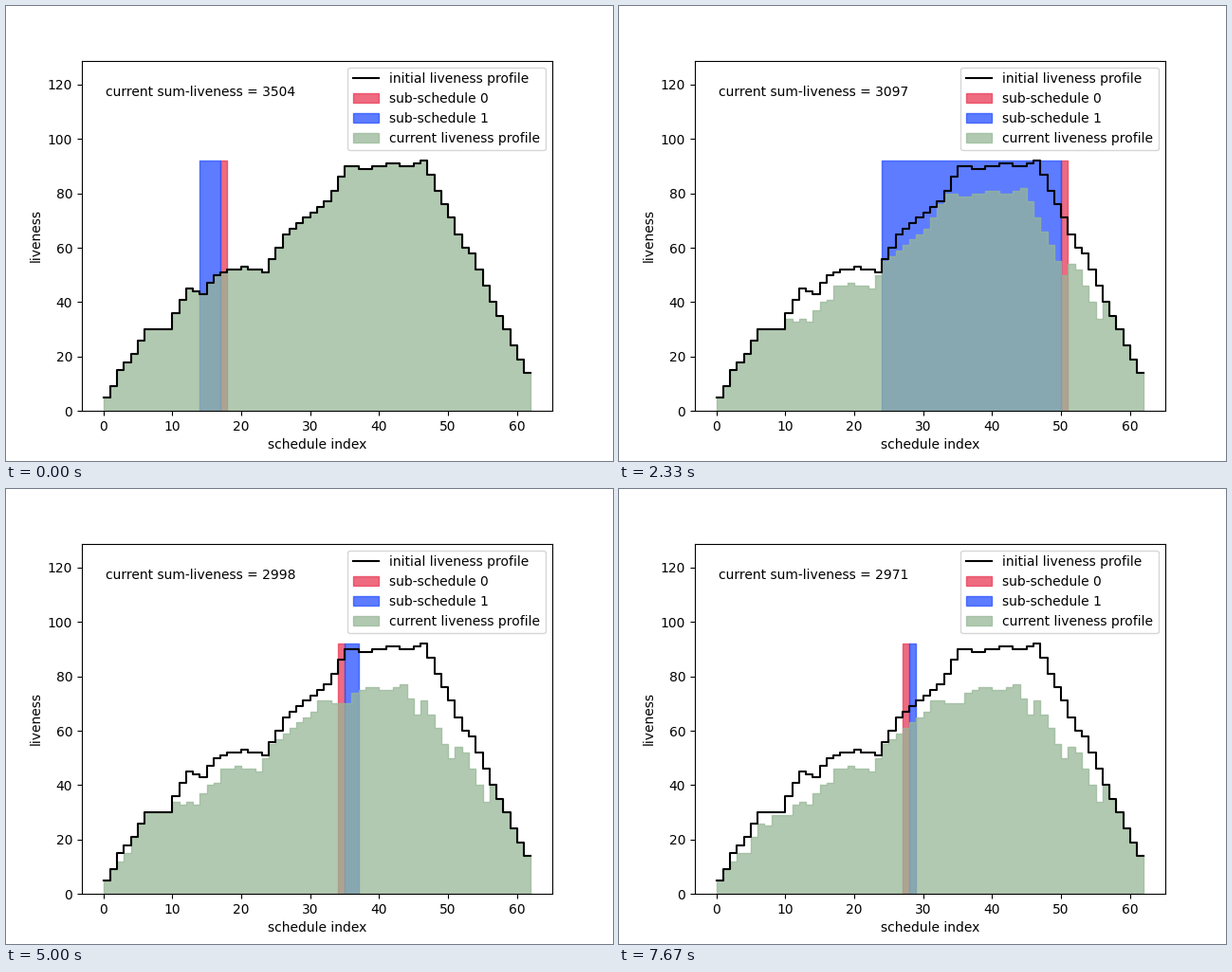
Animation of 640 by 480 pixels, one loop 8000 ms. Source, as a matplotlib script:

```python
import matplotlib.pyplot as plt
import numpy as np
from matplotlib.animation import FuncAnimation

LOOP_MS = 8000
TICK_MS = 40
LEAD_MS = 30  # each tick shows the state reached before the next tick

RED = (233 / 255, 58 / 255, 86 / 255)
BLUE = (39 / 255, 80 / 255, 1.0)
GREEN = (151 / 255, 183 / 255, 151 / 255)
ALPHA = 0.75

# corners of the initial profile, joined by straight slopes
CORNERS = [
    (0, 5), (1, 9), (2, 15), (4, 21), (6, 30), (9, 30), (10, 36), (12, 45),
    (14, 43), (16, 50), (20, 53), (23, 51), (26, 65), (32, 77), (35, 90),
    (38, 89), (41, 91), (44, 90), (46, 92), (52, 60), (53, 58), (56, 40),
    (61, 14),
]

# slot an instruction leaves, slot it is moved to
MOVES = [
    (17, 14), (11, 17), (10, 55), (24, 50), (32, 45), (31, 34),
    (2, 3), (36, 34), (10, 5), (7, 6), (5, 3), (28, 27),
]


def initial_profile():
    xs, ys = zip(*CORNERS)
    levels = np.interp(np.arange(xs[-1] + 1), xs, ys)
    return np.floor(levels + 0.5).astype(int)


def apply_move(profile, src, dst):
    """Shift the passed block by one slot and by the instruction's own rise."""
    result = profile.copy()
    if src < dst:
        rise = profile[src] - profile[src - 1]
        result[src:dst + 1] = profile[src + 1:dst + 2] - rise
    else:
        rise = profile[src + 1] - profile[src]
        result[dst:src + 1] = profile[dst - 1:src] + rise
        result[dst] = max(result[dst], profile[dst])
    return result


def spans(src, dst, moved):
    """Return the spans of the instruction and of the block it passes."""
    first, end = min(src, dst), max(src, dst) + 1
    slot = dst if moved else src
    block = (first + 1, end) if slot == first else (first, end - 1)
    return (slot, slot + 1), block


def closed(profile):
    return np.append(profile, profile[-1])


fig, ax = plt.subplots(figsize=(6.4, 4.8), dpi=100)
profile = initial_profile()
slots = np.arange(len(profile) + 1)
peak = profile.max()
line, = ax.step(slots, closed(profile), where="post", color="black")


def build_state(levels, src, dst, moved):
    bars = [ax.fill_between(span, peak, color=color, alpha=ALPHA)
            for span, color in zip(spans(src, dst, moved), (RED, BLUE))]
    area = ax.fill_between(slots, closed(levels), step="post", color=GREEN,
                           alpha=ALPHA)
    label = ax.text(0.05, 0.9, f"current sum-liveness = {levels.sum()}",
                    transform=ax.transAxes)
    return [*bars, area, label]


states = []
for src, dst in MOVES:
    states.append(build_state(profile, src, dst, False))
    profile = apply_move(profile, src, dst)
    states.append(build_state(profile, src, dst, True))

ax.set_xlim(-3.1, 65.1)
ax.set_ylim(0, 1.4 * peak)
ax.set_xlabel("schedule index")
ax.set_ylabel("liveness")
ax.legend([line, *states[0][:3]],
          ["initial liveness profile", "sub-schedule 0", "sub-schedule 1",
           "current liveness profile"], loc="upper right")


def draw(frame):
    current = (frame * TICK_MS + LEAD_MS) * len(states) // LOOP_MS
    for index, artists in enumerate(states):
        for artist in artists:
            artist.set_visible(index == current)
    return []


animation = FuncAnimation(fig, draw, frames=LOOP_MS // TICK_MS,
                          init_func=lambda: draw(0), interval=TICK_MS,
                          repeat=True, repeat_delay=0)
plt.show()
```
